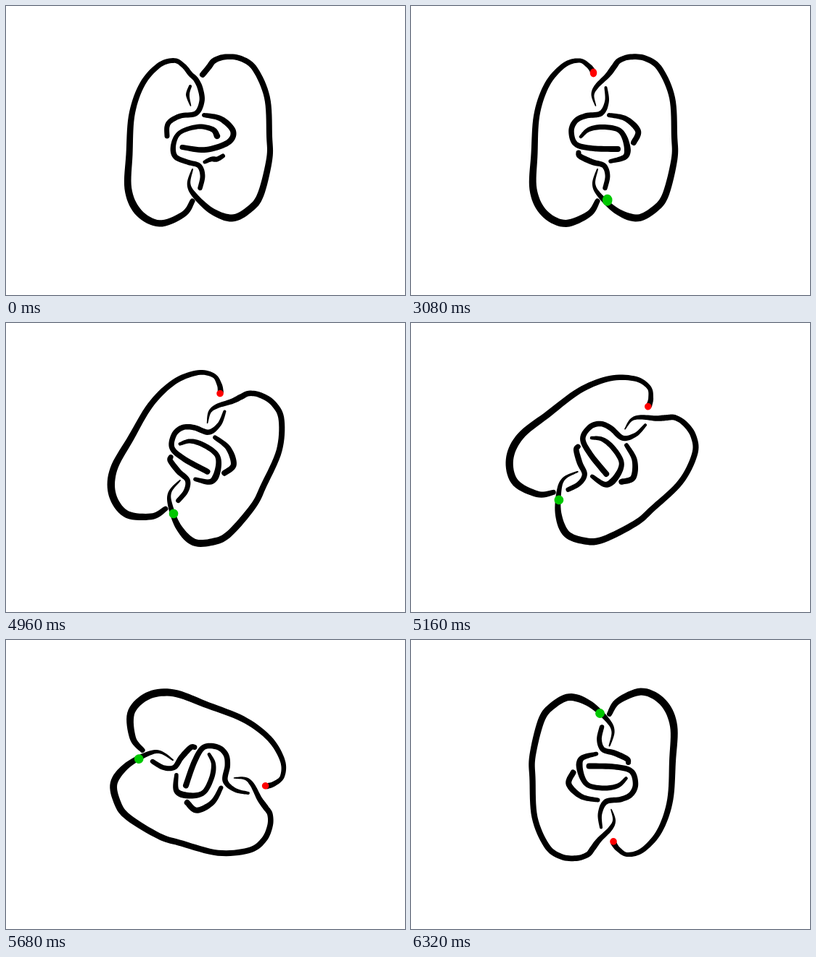
Write an HTML page that moves like this. It is 550 by 400 pixels and loops after 7520 ms.

```html
<!DOCTYPE html>
<html lang="en">
<head>
<meta charset="utf-8">
<title>Knot symmetry</title>
<style>
html, body { margin: 0; width: 100%; height: 100%; overflow: hidden; background: #fff; }
svg { display: block; width: 550px; height: 400px; }
</style>
</head>
<body>
<svg viewBox="0 0 550 400">
  <g id="first"></g>
  <g id="second"></g>
  <g id="marks">
    <ellipse id="green" fill="#00c800"/>
    <ellipse id="red" fill="#f00"/>
  </g>
</svg>
<script>
const LOOP = 7520, MARK = 1360, CHANGE = 3080, TURN = 4720, STEP = 40, STEPS = 40;
const CENTRE = '265.25 186.25';
const $ = id => document.getElementById(id);

// Key points of the strands that both diagrams share.
const leftLoop = [[257, 270], [245, 288], [212, 301], [183, 286], [168.5, 254], [170, 205],
  [173.5, 150], [188, 108], [211, 82], [232, 75.5], [245, 83]];
const rightLoop = [[280, 84], [287, 75.5], [302, 70.5], [323, 72.5], [343, 87], [360, 127],
  [363, 180], [363, 212], [351, 261], [336, 281], [312, 293.5], [284, 284],
  [260, 262], [252, 246], [257, 226]];
const upperTwist = [[270, 132], [262, 148.5], [241, 152], [227, 159]];
const lowerTwist = [[233, 208], [250, 216], [266, 221], [271, 235], [267.5, 252]];
const curl = [[273, 151], [296, 156], [313, 173]];

// Spreads a few values evenly over u = 0..1.
function blend(values, u) {
  const s = u * (values.length - 1), i = Math.min(Math.floor(s), values.length - 2);
  return values[i] + (values[i + 1] - values[i]) * (s - i);
}

// Catmull-Rom point at u = 0..1.
function along(points, u) {
  const s = u * (points.length - 1), i = Math.min(Math.floor(s), points.length - 2), f = s - i;
  const at = k => points[Math.min(Math.max(k, 0), points.length - 1)];
  const [a, b, c, d] = [at(i - 1), at(i), at(i + 1), at(i + 2)];
  return b.map((v, j) => v + f / 2 * (c[j] - a[j]
    + f * (2 * a[j] - 5 * v + 4 * c[j] - d[j] + f * (3 * (v - c[j]) + d[j] - a[j]))));
}

// Outline of a brush stroke with round ends.
function outline(points, widths) {
  const left = [], right = [], n = points.length * 8;
  for (let i = 0; i <= n; i++) {
    const u = i / n, [x, y] = along(points, u);
    const [px, py] = along(points, Math.max(u - 1 / n, 0));
    const [qx, qy] = along(points, Math.min(u + 1 / n, 1));
    const k = blend(widths, u) / 2 / Math.hypot(qx - px, qy - py);
    const nx = (py - qy) * k, ny = (qx - px) * k;
    left.push(`${x + nx} ${y + ny}`);
    right.unshift(`${x - nx} ${y - ny}`);
  }
  const cap = w => `A${w / 2} ${w / 2} 0 0 0 `;
  return 'M' + left.join('L') + cap(widths[widths.length - 1]) + right.join('L')
    + cap(widths[0]) + left[0] + 'Z';
}

function brush(group, points, ...widths) {
  const path = document.createElementNS('http://www.w3.org/2000/svg', 'path');
  path.setAttribute('d', outline(points, widths));
  group.append(path);
}

function drawFirst(g) {
  brush(g, [...leftLoop, [254, 94], [262, 102], [268, 115], ...upperTwist, [222, 167], [222, 180]],
    7, 10.5, 8, 6.5, 7.5, 7, 7);
  brush(g, [[271, 95], ...rightLoop], 8, 8, 7.5, 8, 8, 9.5, 10, 7, 2);
  brush(g, [[254, 111], [250.5, 123], [254.5, 138]], 4, 5, 1.5);
  brush(g, [[291, 180], [285, 171], [265, 167], [240, 175], [231, 191], ...lowerTwist],
    8.5, 7, 6, 7.5, 7, 7, 6.5);
  brush(g, [...curl, [306, 189], [275, 199], [243, 195.5]], 6, 8, 8, 8, 7);
  brush(g, [[274, 216], [283, 212], [291, 212], [299, 207.5]], 5, 7.5, 6);
}

function drawSecond(g) {
  brush(g, [...leftLoop, [251, 91]], 7, 10, 10.5, 8.5, 7.5, 6, 8);
  brush(g, [[254.5, 138], [250.5, 123], [256, 111], [271, 96], ...rightLoop],
    1.5, 6, 8, 7.5, 8, 8, 8.5, 9.5, 10, 6, 2);
  brush(g, [[268.5, 113], ...upperTwist, [221, 173], [227, 191], [250, 197], [285, 198]],
    4, 7.5, 7.5, 7.5, 8);
  brush(g, [[234, 181], [245, 171], [264, 167.5], [287, 172], [297, 190], [296, 208], [275, 215]],
    4.5, 7, 7, 9, 5.5);
  brush(g, [[231, 203], ...lowerTwist], 7, 8, 7, 6.5);
  brush(g, [...curl, [307, 189]], 6, 8, 8);
}

function dot(el, cx, cy, rx, ry = rx) {
  Object.entries({ cx, cy, rx, ry }).forEach(([k, v]) => el.setAttribute(k, v));
}

function show(el, on) {
  el.setAttribute('visibility', on ? 'visible' : 'hidden');
}

function render(t) {
  const changed = t >= CHANGE;
  show($('first'), !changed);
  show($('second'), changed);
  show($('marks'), t >= MARK);
  if (!changed) {
    dot($('red'), 261.7, 104.3, 4.7);
    dot($('green'), 270, 266.8, 6.3);
  } else if (t < TURN) {
    dot($('red'), 251.5, 92.5, 4.8, 6);
    dot($('green'), 270.7, 268.7, 6.8, 8);
  } else {
    dot($('red'), 251.5, 93.6, 4.8);
    dot($('green'), 270, 271, 6.4);
  }
  const step = Math.min(Math.max(Math.floor((t - TURN) / STEP), 0), STEPS);
  const turn = `rotate(${step * 180 / STEPS} ${CENTRE})`;
  $('second').setAttribute('transform', turn);
  $('marks').setAttribute('transform', turn);
}

drawFirst($('first'));
drawSecond($('second'));
const start = performance.now();
function tick() {
  render((performance.now() - start) % LOOP);
  requestAnimationFrame(tick);
}
tick();
</script>
</body>
</html>
```
